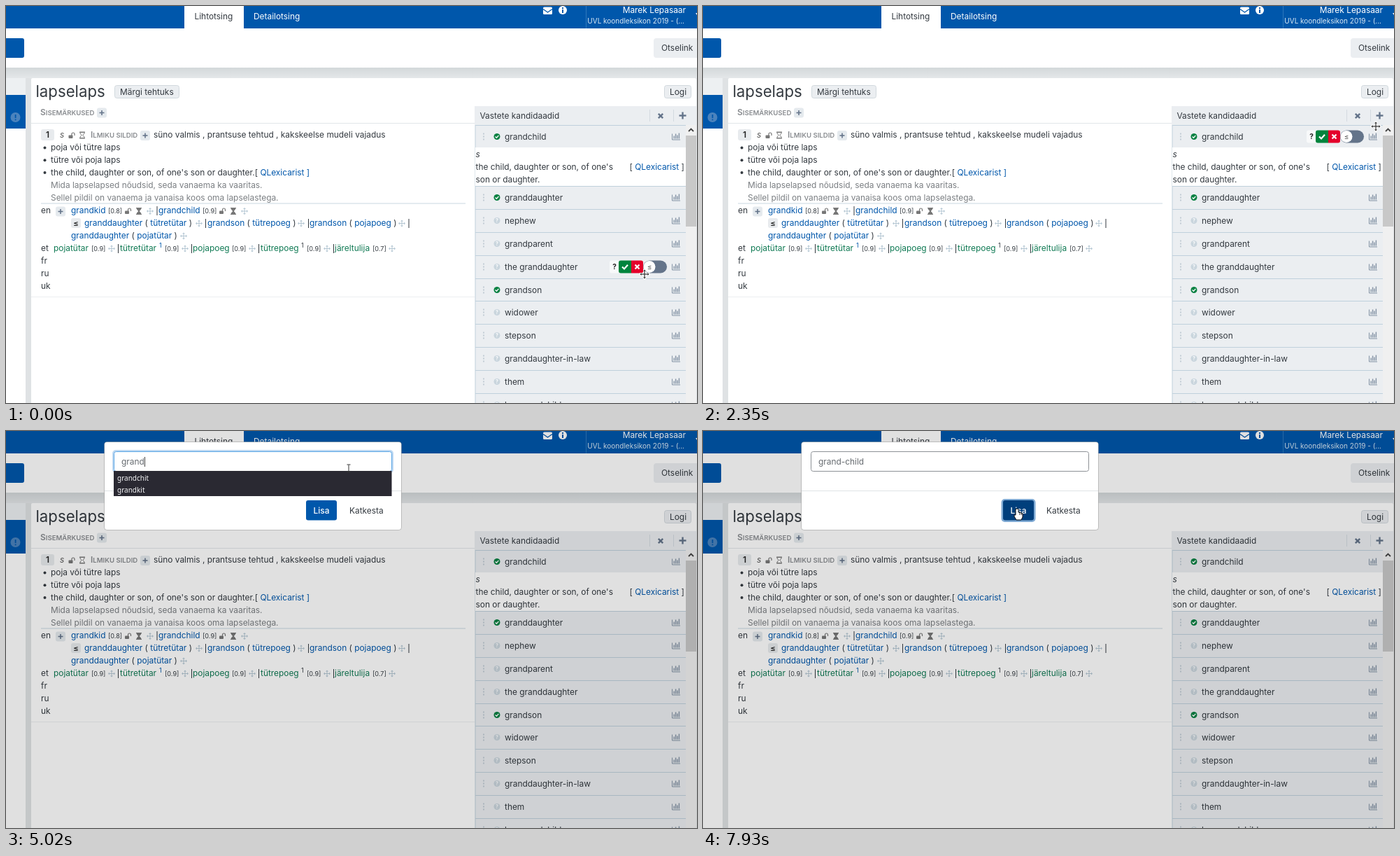
These frames come from a looping animation (988x567 px, 8000 ms). An HTML page with a canvas:

```html
<!DOCTYPE html>
<html lang="et">
<head>
<meta charset="utf-8">
<title>Vastete kandidaadid</title>
<style>
html, body { margin: 0; width: 100%; height: 100%; overflow: hidden; background: #fff; }
canvas { display: block; }
</style>
</head>
<body>
<canvas id="stage" width="988" height="567"></canvas>
<script>
const ctx = document.getElementById('stage').getContext('2d');
const LOOP = 8000, BODY = 11.9;
const BLUE = '#0057ab', INK = '#343a40', GREEN = '#107a54', SLATE = '#64748a';
const PALE = '#ebeef1', EDGE = '#bfd0dc', MUTED = '#8a8d91', MOVE = '#b6c8d4';

function box(x, y, w, h, fill, r = 0, stroke) {
  ctx.beginPath();
  ctx.roundRect(x, y, w, h, r);
  if (fill) { ctx.fillStyle = fill; ctx.fill(); }
  if (stroke) { ctx.strokeStyle = stroke; ctx.lineWidth = 1; ctx.stroke(); }
}

function disc(x, y, r, fill) {
  ctx.beginPath();
  ctx.arc(x, y, r, 0, 7);
  ctx.fillStyle = fill;
  ctx.fill();
}

// Polyline through a flat list of coordinates, relative to (x, y).
function trace(x, y, pts, { fill, stroke, width = 1, close } = {}) {
  ctx.beginPath();
  for (let i = 0; i < pts.length; i += 2) ctx.lineTo(x + pts[i], y + pts[i + 1]);
  if (close) ctx.closePath();
  if (fill) { ctx.fillStyle = fill; ctx.fill(); }
  if (stroke) { ctx.strokeStyle = stroke; ctx.lineWidth = width; ctx.stroke(); }
}

// Text whose capitals are centred on y; returns the x where it ends.
function label(s, x, y, color = INK, size = BODY, { style = '', align = 'left', family = 'Inter' } = {}) {
  ctx.font = `${style} ${size}px ${family}, sans-serif`;
  ctx.textAlign = align;
  ctx.fillStyle = color;
  ctx.fillText(s, x, Math.round(y + size * 0.36));
  return x + ctx.measureText(s).width;
}

function smallCaps(first, rest, x, y) {
  const opts = { style: '600' };
  label(rest, label(first, x, y, MUTED, BODY, opts), y + 0.6, MUTED, 9.6, opts);
}

function plus(x, y, color, r = 4, width = 2) {
  box(x - r, y - width / 2, 2 * r, width, color);
  box(x - width / 2, y - r, width, 2 * r, color);
}

function cross(x, y, r, color, width = 2) {
  trace(x, y, [-r, -r, r, r], { stroke: color, width });
  trace(x, y, [r, -r, -r, r], { stroke: color, width });
}

function plusButton(x, y) {
  box(x - 7, y - 7, 14, 14, '#e5eaee', 3);
  plus(x, y, SLATE, 3.5, 1.6);
}

function arrows(x, y, color, r, width) {
  plus(x, y, color, r - 1, width);
  for (let i = 0; i < 4; i++) {
    ctx.save();
    ctx.translate(x, y);
    ctx.rotate(i * Math.PI / 2);
    trace(0, 0, [-2, 2 - r, 0, -r, 2, 2 - r], { fill: color });
    ctx.restore();
  }
}

function unlock(x, y) {
  box(x - 4.5, y - 0.5, 6, 4.5, '#777', 1);
  ctx.beginPath();
  ctx.moveTo(x, y);
  ctx.arc(x + 2, y - 2, 2, Math.PI, 0);
  ctx.lineTo(x + 4, y);
  ctx.strokeStyle = '#777';
  ctx.lineWidth = 1.2;
  ctx.stroke();
}

function hourglass(x, y, hollow) {
  const shape = [-3, -4, 3, -4, 3, -2.5, 0.8, 0, 3, 2.5, 3, 4, -3, 4, -3, 2.5, -0.8, 0, -3, -2.5];
  trace(x, y, shape, hollow ? { stroke: '#777', close: true } : { fill: '#777' });
  box(x - 4, y - 5, 8, 1.3, '#777');
  box(x - 4, y + 3.7, 8, 1.3, '#777');
}

function tick(x, y, r, color = '#fff') {
  trace(x, y, [-r, 0, -r * 0.25, r * 0.75, r, -r * 0.7], { stroke: color, width: r * 0.55 });
}

function chart(x, y) {
  trace(x, y, [-5.5, -4, -5.5, 4.5, 6, 4.5], { stroke: '#8292a4' });
  [4, 7, 5, 8].forEach((h, i) => box(x - 3.5 + i * 2.4, y + 3 - h, 1.4, h, '#8292a4'));
}

function button(s, x, y, w, h, tx, border) {
  box(x + 0.5, y + 0.5, w - 1, h - 1, PALE, 3, border);
  label(s, tx, y + h / 2);
}

function topBar() {
  box(0, 0, 988, 567, '#fff');
  box(0, 0, 988, 32, BLUE);
  box(255, 0, 85, 32, '#fff');
  label('Lihtotsing', 269.5, 14.5);
  label('Detailotsing', 354, 14.5, '#fff');

  box(768, 1.5, 13, 10.5, '#fff', 1.5);
  trace(768, 2, [0, 2.5, 6.5, 7, 13, 2.5], { stroke: BLUE, width: 1.2 });
  disc(796, 6, 6, '#fff');
  box(795, 2, 2, 2, BLUE);
  box(795, 5, 2, 5, BLUE);
  box(829, 0, 1, 32, '#2f78bc');
  label('Marek Lepasaar', 972, 5.5, '#fff', BODY, { align: 'right' });
  label('UVL koondleksikon 2019 - (...', 970, 21, '#dce9f5', 10, { align: 'right' });
  trace(986, 10, [0, 0, 4, 0, 2, 3], { fill: '#fff' });

  box(-4, 46, 30, 28, BLUE, 3);
  box(926, 46, 70, 28, PALE, 4);
  label('Otselink', 937, 60);
}

function backdrop() {
  const g = ctx.createLinearGradient(0, 88, 0, 103);
  g.addColorStop(0, '#d3d8da');
  g.addColorStop(1, '#e4e7e9');
  box(0, 88, 988, 479, '#dfe2e4');
  box(0, 88, 988, 15, g);
  box(0, 103, 28, 464, '#fff');
  box(0, 103, 28, 24, '#edf0f2');
  box(0, 127, 28, 48, BLUE);
  disc(13.5, 159, 7, '#4b83bd');
  box(12.7, 155, 1.8, 5, BLUE);
  box(12.7, 161.5, 1.8, 1.8, BLUE);
  box(36, 103, 951, 470, '#fff', 2);
}

function entry() {
  label('lapselaps', 42.5, 122.5, INK, 22.2);
  button('Märgi tehtuks', 155, 113, 93, 19, 163, '#d2d9de');
  button('Logi', 941, 113, 39, 19, 949, '#d2d9de');
  smallCaps('S', 'ISEMÄRKUSED', 49, 152);
  plusButton(137, 152.5);
  box(36, 167, 634, 1, '#e2e6e9');

  box(50, 176, 19, 16, '#e8ebee', 3);
  label('1', 59.5, 184, '#222', BODY, { style: '600', align: 'center' });
  label('s', 77, 184, '#555', BODY, { style: 'italic' });
  unlock(94, 185);
  hourglass(109, 184.5, true);
  smallCaps('I', 'LMIKU SILDID', 121, 184);
  plusButton(199, 185);
  label('süno valmis , prantsuse tehtud , kakskeelse mudeli vajadus', 211, 184);

  const uses = ['poja või tütre laps', 'tütre või poja laps',
    "the child, daughter or son, of one's son or daughter."];
  let end;
  uses.forEach((s, i) => {
    const y = 202 + i * 17.8;
    disc(55.5, y + 0.5, 2, INK);
    end = label(s, 64, y);
  });
  end = label('[ ', end, 237.6);
  label('QLexicarist ]', end, 237.6, BLUE);
  label('Mida lapselapsed nõudsid, seda vanaema ka vaaritas.', 64, 255.5, '#7b7f83');
  label('Sellel pildil on vanaema ja vanaisa koos oma lapselastega.', 64, 273.4, '#7b7f83');
  box(50, 281.5, 607, 1, '#cad8e1');
}

const score = (s, x, y) => label(`[${s}]`, x, y + 0.5, INK, 9.1);
const bar = (x, y) => box(x, y - 6, 1, 13, INK);

function related(word, inner, x, y) {
  let end = label(word, x, y, BLUE);
  end = label(' ( ', end, y);
  end = label(inner, end, y, BLUE);
  label(' )', end, y);
}

function matches() {
  ['en', '', '', 'et', 'fr', 'ru', 'uk'].forEach((s, i) => label(s, 50, 292 + i * 17.9));
  plusButton(78, 293.5);

  label('grandkid', 93, 292, BLUE);
  label('grandchild', 218, 292, BLUE);
  score('0.8', 146, 292);
  score('0.9', 281, 292);
  bar(215.5, 292);
  [174, 309].forEach(x => {
    unlock(x + 0.5, 293);
    hourglass(x + 16, 293);
    arrows(x + 32, 293, MOVE, 5, 1);
  });

  box(93, 303, 14, 14, '#e8ebee', 3);
  label('≤', 100, 310, '#222', 11, { style: '600', align: 'center' });
  related('granddaughter', 'tütretütar', 112, 310);
  related('grandson', 'tütrepoeg', 288, 310);
  related('grandson', 'pojapoeg', 434, 310);
  [[276, 285], [422, 432], [566, 575.5]].forEach(([m, b]) => {
    arrows(m, 310.5, MOVE, 5, 1);
    bar(b, 310);
  });
  related('granddaughter', 'pojatütar', 93, 328);
  arrows(254, 328.5, MOVE, 5, 1);

  const words = [['pojatütar', 68, 122, 151], ['tütretütar', 163, 227, 256], ['pojapoeg', 267, 323, 352],
    ['tütrepoeg', 364, 430, 459], ['järeltulija', 470, 524, 552]];
  words.forEach(([w, x, sx, mx], i) => {
    label(w, x, 346, GREEN);
    score(i === 4 ? '0.7' : '0.9', sx, 346);
    arrows(mx, 346.5, MOVE, 5, 1);
    if (i < 4) bar(mx + 9, 346);
  });
  label('1', 219, 342, BLUE, 9);
  label('1', 422, 342, INK, 9);
  box(36, 415, 634, 1, '#eceef0');
}

const ROWS = ['grandchild', 'granddaughter', 'nephew', 'grandparent', 'the granddaughter',
  'grandson', 'widower', 'stepson', 'granddaughter-in-law', 'them', 'her grandchild'];
const rowTop = i => i ? Math.round(225 + i * 32.9) : 171;

function controls(y) {
  box(863, y - 9, 14, 18, '#f8f9fa', 3);
  label('?', 870, y, '#222', 10, { style: '700', align: 'center' });
  box(876, y - 9, 18, 18, '#00843d', [3, 0, 0, 3]);
  tick(885, y, 4);
  box(894, y - 9, 17, 18, '#e4002b', [0, 3, 3, 0]);
  cross(902.5, y, 3, '#fff', 2.2);
  box(911, y - 9, 34, 18, SLATE, 9);
  disc(920, y, 8.5, '#fff');
  label('≤', 920, y, '#555', 10, { align: 'center' });
}

function candidates(mouse, cell) {
  box(670, 143, 317, 27, PALE);
  box(957, 143, 23, 27, cell);
  label('Vastete kandidaadid', 677.5, 157);
  box(920, 148, 1, 17, '#d3dae0');
  box(954, 148, 1, 17, '#d3dae0');
  cross(936, 157, 3.2, SLATE, 2.4);
  plus(967.5, 156.5, SLATE, 5, 2.4);

  ROWS.forEach((name, i) => {
    const y = rowTop(i), mid = y + 15.5;
    box(671, y, 301, 32, PALE);
    box(671, y - 1, 301, 1, EDGE);
    for (let k = -1; k < 2; k++) box(682, mid + k * 4 - 1, 2, 2, '#c3cdd6');
    if ([0, 1, 5].includes(i)) {
      disc(702, mid, 4.5, '#0b8243');
      tick(702, mid, 2.4);
    } else {
      disc(702, mid, 4.5, '#c9d5dd');
      label('?', 702, mid, '#fff', 7, { style: '700', align: 'center' });
    }
    label(name, 713, mid);
    chart(958, mid);
    if (mouse && mouse.y >= y && mouse.y < y + 32) controls(mid);
  });
  box(670.5, 170, 1, 397, EDGE);
  box(671, 202, 301, 55, '#fff');
  label('s', 671.5, 212, INK, BODY, { style: 'italic' });
  label("the child, daughter or son, of one's", 671.5, 230);
  label('son or daughter.', 671.5, 247.5);
  let end = label('[ ', 891.5, 230);
  end = label('QLexicarist', end, 230, BLUE);
  label(' ]', end, 230);

  box(972, 170, 15, 397, '#f0f0f0');
  box(972, 185, 15, 130, '#c8c8c8');
  trace(979.5, 177, [-3.5, 2, 0, -1.5, 3.5, 2], { stroke: '#444', width: 1.8 });
}

function tooltip(alpha) {
  if (alpha <= 0) return;
  ctx.globalAlpha = alpha;
  box(912, 121, 90, 23, '#111', 4);
  trace(968, 144, [-5, 0, 5, 0, 0, 5], { fill: '#111' });
  label('Lisa kandidaat', 919, 133, '#fff', 10);
  ctx.globalAlpha = 1;
}

// Moments at which the field's text changes.
const TYPED = [[3300, ''], [4360, 'g'], [4500, 'gr'], [4640, 'gra'], [4860, 'gran'], [5020, 'grand'],
  [5320, 'grand-'], [5990, 'grand-c'], [6190, 'grand-ch'], [6380, 'grand-chil'], [6520, 'grand-child']];
const CARET_OFF = [[3820, 4360], [5860, 5990], [6520, 7040], [7590, LOOP]];

function dialog(t, mouse) {
  const done = t >= 7840;
  box(140.5, 15.5, 425, 126, '#fff', 4, 'rgba(0,0,0,.22)');
  box(141, 85, 424, 1, '#dfe3e6');
  if (!done) box(152, 27, 402, 33, '#bfd9f2', 5);
  box(154.5, 29.5, 397, 28, '#fff', 3, done ? '#8d9196' : '#5aa6e6');

  const text = TYPED.filter(k => k[0] <= t).pop()[1];
  const end = label(text, 165, 43.5, '#666b70');
  if (!CARET_OFF.some(([a, b]) => t >= a && t < b)) box(Math.round(end), 37, 1, 14, '#444');

  if (t >= 4360 && t < 5390) {
    box(154, 57, 397.5, 36, '#2a2932');
    ['grandchit', 'grandkit'].forEach((s, i) =>
      label(s, 159, 67.5 + i * 17, '#f4f4f6', 10, { family: '"Noto Sans"' }));
  }

  const over = mouse.y > 99 && mouse.x < 473 && t > 7040;
  if (done) box(426.5, 97, 49, 33, '#7faad4', 5);
  box(429, 99, 44, 28.5, done ? '#003f7c' : over ? '#004a92' : BLUE, 3);
  label('Lisa', 451, 114, '#fff', BODY, { style: '500', align: 'center' });
  label('Katkesta', 491, 114);
}

const PATH = [[0, 913, 383], [70, 913, 383], [810, 957, 170], [880, 963, 157], [1660, 963, 157],
  [1730, 963, 155], [1940, 962, 172], [2350, 962, 172], [2490, 964, 158], [2760, 965, 156],
  [3700, 965, 156], [3960, 490, 53], [5990, 490, 53], [6190, 489, 53], [7040, 489, 53],
  [7440, 449, 111], [LOOP, 449, 111]];

function mouseAt(t) {
  const i = PATH.findIndex(k => k[0] > t);
  const [t0, x0, y0] = PATH[i - 1], [t1, x1, y1] = PATH[i];
  const p = (t - t0) / (t1 - t0);
  return { x: x0 + (x1 - x0) * p, y: y0 + (y1 - y0) * p };
}

function hand(x, y) {
  trace(x, y, [-1, 0, 1, 0, 2, 1, 2, 5, 5, 5.5, 8, 7, 8, 12, 6, 16, -1, 16, -4, 11, -4, 9, -2, 9, -2, 1],
    { fill: '#fff', stroke: '#111', close: true });
  [3.5, 5.8].forEach(dx => box(x + dx, y + 6, 0.8, 3, '#111'));
}

function arrow(x, y) {
  trace(x, y, [0, 0, 0, 12, 3, 9.5, 5, 14, 7, 13, 5, 8.5, 8.5, 8.5],
    { fill: '#fff', stroke: '#111', close: true });
}

function beam(x, y) {
  box(x - 0.5, y - 4.5, 1, 10, '#333');
  box(x - 2.5, y - 5.5, 5, 1, '#333');
  box(x - 2.5, y + 5, 5, 1, '#333');
}

function pointer(t, { x, y }) {
  if (t < 3300) {
    if (y < 165) return hand(x, y);
    arrows(x, y, '#fff', 8, 4);
    arrows(x, y, '#333', 6.5, 1.2);
  } else if (t >= 3960 && y < 58) beam(x, y);
  else if (t > 7040 && y > 99 && x < 473) hand(x, y);
  else arrow(x, y);
}

const ramp = (t, a, b) => Math.min(1, Math.max(0, (t - a) / (b - a)));

function draw(t) {
  const mouse = mouseAt(t), open = t >= 3300;
  const onPlus = !open && mouse.y < 165;
  topBar();
  backdrop();
  entry();
  matches();
  candidates(open ? null : mouse, !onPlus ? PALE : t >= 3160 ? '#cbd1d6' : '#dfe4e8');
  if (open) {
    box(0, 0, 988, 567, 'rgba(0,0,0,.12)');
    dialog(t, mouse);
  } else {
    tooltip(ramp(t, 840, 940) - ramp(t, 1870, 1970) + ramp(t, 2400, 2500));
  }
  pointer(t, mouse);
}

function frame() {
  draw(performance.now() % LOOP);
  requestAnimationFrame(frame);
}
frame();
</script>
</body>
</html>
```
